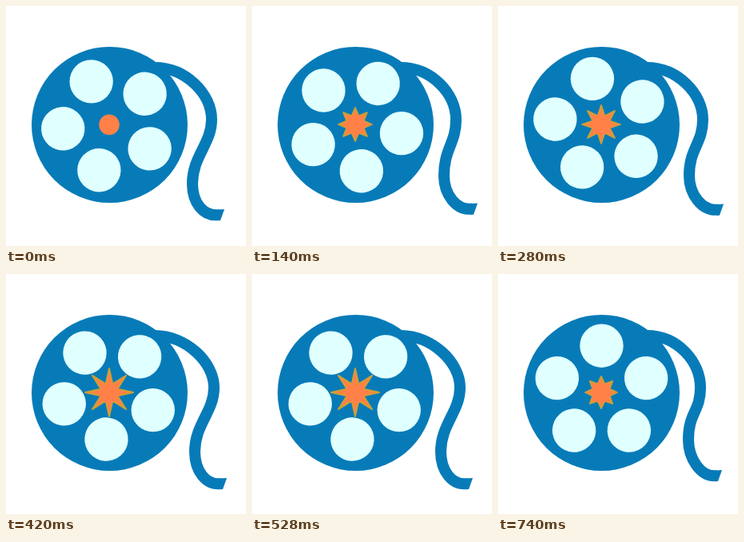
Write an HTML page that moves like this. It is 300x300 px and loops after 880 ms.

```html
<!DOCTYPE html>
<html lang="en">
<head>
<meta charset="utf-8">
<title>Film reel</title>
<style>
  html, body { margin: 0; width: 100%; height: 100%; overflow: hidden; background: #fff; }
  svg { display: block; width: 100%; height: 100%; }
  .reel { fill: #077bb8; }
  .strip { fill: none; stroke: #077bb8; stroke-width: 14; }
  .hole { fill: #e0ffff; }
  .hub { fill: #ff8148; }
  .star { fill: #ff8148; stroke: #cfa032; stroke-width: 1.8; stroke-linejoin: round; }
</style>
</head>
<body>
<svg viewBox="0 0 300 300">
  <path class="strip" id="strip"/>
  <path class="reel" id="tip"/>
  <circle class="reel" cx="129.5" cy="148.5" r="97.5"/>
  <g id="holes"></g>
  <path class="star" id="star"/>
  <circle class="hub" cx="129" cy="148.5" r="12.7"/>
</svg>
<script>
const LOOP = 880;
const byId = id => document.getElementById(id);

// from: start in ms, turn: reel angle, ray: star radius,
// right: x of the outer bend, low: inner bend, end: corner of the strip
const poses = [
  { from: 0,   turn: 49,   ray: 11.5, right: 257, low: [233, 222], end: [273, 254] },
  { from: 140, turn: 28.8, ray: 21,   right: 255, low: [240, 212], end: [282, 246.5] },
  { from: 280, turn: 60.6, ray: 24,   right: 256, low: [239, 212], end: [282, 247.5] },
  { from: 420, turn: 40,   ray: 30,   right: 260, low: [236, 222], end: [276, 255] },
  { from: 600, turn: 20.9, ray: 25,   right: 260, low: [250, 206], end: [296, 242] },
  { from: 740, turn: 0,    ray: 20,   right: 253, low: [238, 207], end: [280, 245] }
];

for (let i = 0; i < 5; i++) {
  const hole = document.createElementNS("http://www.w3.org/2000/svg", "circle");
  hole.setAttribute("class", "hole");
  hole.setAttribute("cx", 129.5);
  hole.setAttribute("cy", 89.7);
  hole.setAttribute("r", 27.2);
  hole.setAttribute("transform", `rotate(${i * 72} 129.5 148.2)`);
  byId("holes").append(hole);
}

function starPath(ray) {
  const points = Array.from({ length: 16 }, (_, i) => {
    const r = i % 2 ? 11.5 : ray, a = i * Math.PI / 8;
    return `${129 + r * Math.sin(a)} ${148 - r * Math.cos(a)}`;
  });
  return `M${points.join("L")}Z`;
}

function stripPath({ right, low: [lx, ly], end: [ex, ey] }) {
  const x = ex - 6, y = ey + 7;
  return `M186 77C225 77 ${right} 110 ${right} 142` +
    `C${right} 172 ${lx} ${ly - 34} ${lx} ${ly}` +
    `C${lx} ${ly + 23} ${x - 21} ${y + 3} ${x} ${y}`;
}

let shown;
function draw(now) {
  const t = now % LOOP;
  const pose = poses.findLast(p => p.from <= t);
  if (pose !== shown) {
    shown = pose;
    byId("holes").setAttribute("transform", `rotate(${pose.turn} 129.5 148.2)`);
    byId("star").setAttribute("d", starPath(pose.ray));
    byId("strip").setAttribute("d", stripPath(pose));
    byId("tip").setAttribute("d", `M${pose.end}l-5 14h-4l1-13.5z`);
  }
}

const start = performance.now();
function tick() {
  draw(performance.now() - start);
  requestAnimationFrame(tick);
}
tick();
</script>
</body>
</html>
```
